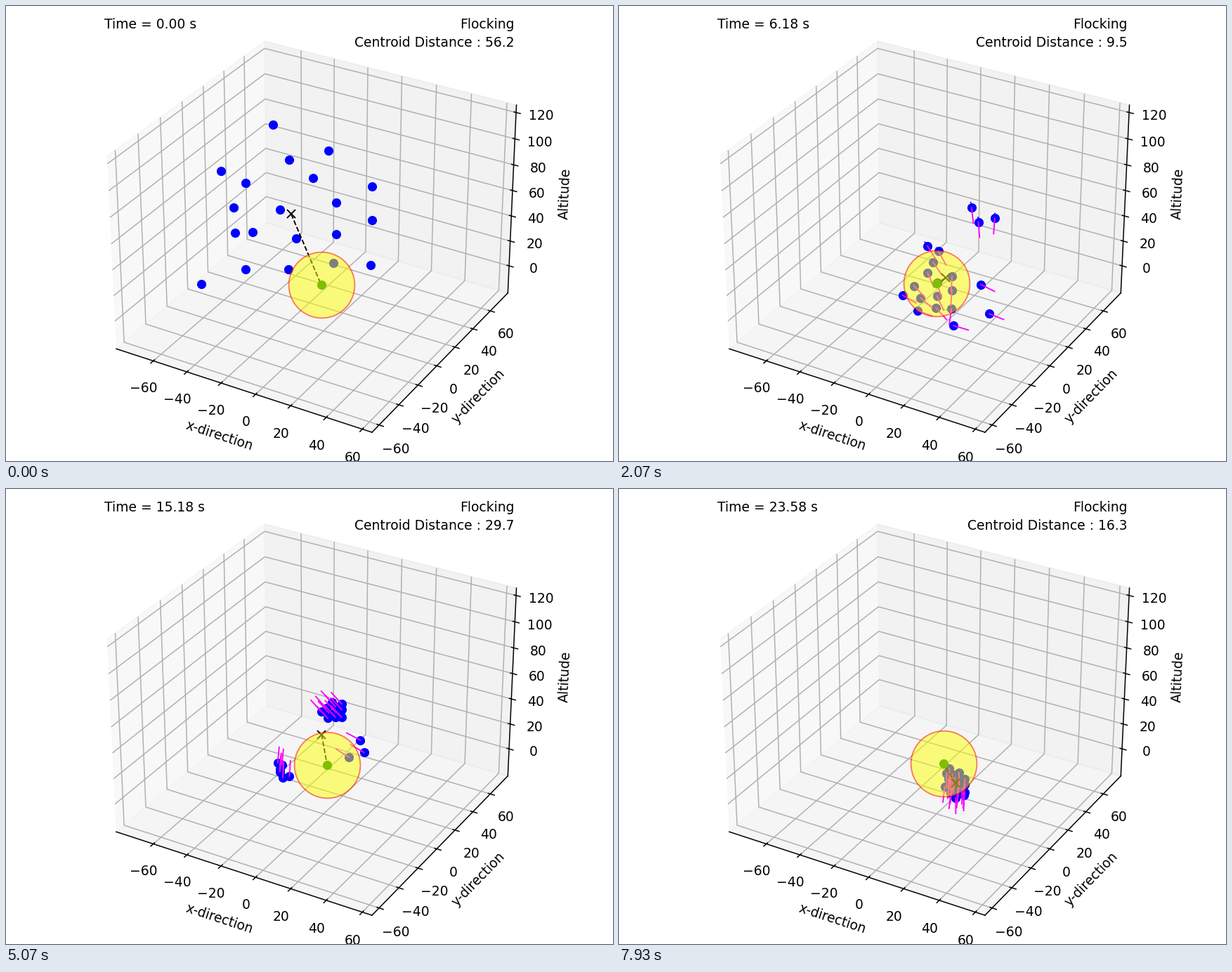
Recreate the animation shown at these times as a matplotlib script. Size 864 by 648 pixels, loop 8 s.

```python
import numpy as np
import matplotlib.pyplot as plt
from matplotlib.animation import FuncAnimation

FRAMES, LOOP_MS = 120, 8000
W, H = 864, 648
GOLDEN = np.pi * (3 - 5 ** 0.5)
ARROW = 22

KEYS = np.array([0, 13, 31, 46, 63, 90, 119, 131])
GAPS = np.array([56.2, 47.6, 9.5, 22.5, 25.3, 32.1, 16, 15])


def spline(points, k):
    """Smooth curve through one point per key, evaluated at frame k."""
    slope = np.gradient(points, KEYS, axis=0)
    i = min(np.searchsorted(KEYS, k, side="right") - 1, len(KEYS) - 2)
    h = KEYS[i + 1] - KEYS[i]
    s = (k - KEYS[i]) / h
    return ((1 + 2 * s) * (1 - s) ** 2 * points[i]
            + s * (1 - s) ** 2 * h * slope[i]
            + s * s * (3 - 2 * s) * points[i + 1]
            - s * s * (1 - s) * h * slope[i + 1])


class Squad:
    """Birds on a sunflower disc that contracts while its centre flies a path."""

    def __init__(self, size, radius, phase, settle, path):
        j = np.arange(size)
        r = radius * np.sqrt((j + 0.5) / size)
        a = np.radians(phase) + GOLDEN * j
        disc = np.column_stack([r * np.cos(a), 0.85 * r * np.sin(a)])
        self.disc = disc - disc.mean(axis=0)
        self.settle = settle
        self.path = np.array(path, float)

    def at(self, k):
        spread = 0.17 + 0.83 * np.exp(-(k / self.settle) ** 2)
        return spline(self.path, k) + spread * self.disc


squads = [
    Squad(3, 60, 95, 28, [(414, 198), (473, 187), (516, 299), (496, 432),
                          (411, 454), (409, 353), (476, 405), (458, 433)]),
    Squad(3, 42, -40, 30, [(324, 258), (352, 260), (447, 352), (473, 438),
                           (401, 441), (404, 345), (469, 411), (451, 439)]),
    Squad(3, 65, 6, 60, [(315, 365), (387, 374), (506, 430), (551, 441),
                         (559, 413), (436, 342), (486, 437), (468, 466)]),
    Squad(11, 105, 20, 28, [(451, 315), (442, 342), (445, 409), (475, 415),
                            (485, 353), (445, 304), (480, 426), (462, 454)]),
]


def flock(k):
    return np.vstack([s.at(k) for s in squads])


def headings(k):
    v = flock(k + 0.5) - flock(k - 0.5)
    return ARROW * v / (np.linalg.norm(v, axis=1, keepdims=True) + 1e-9)


def strokes(a, b):
    """Separate segments a -> b as one broken polyline."""
    return np.stack([a, b, np.full_like(a, np.nan)], axis=1).reshape(-1, 2).T


fig = plt.figure(figsize=(6.4, 4.8), dpi=135)

ax = fig.add_axes([0, 0, 1, 1], projection="3d")
ax.set_xlim(-82.4, 65.3)
ax.set_ylim(-67.1, 80.6)
ax.set_zlim(-22.1, 125.6)
ax.set_xticks(range(-60, 61, 20))
ax.set_yticks(range(-60, 61, 20))
ax.set_zticks(range(0, 121, 20))
ax.set_xlabel("x-direction")
ax.set_ylabel("y-direction")
ax.set_zlabel("Altitude")

clock = ax.text2D(0.05, 0.95, "", transform=ax.transAxes)
ax.text2D(0.95, 0.95, "Flocking", ha="right", transform=ax.transAxes)
gap_text = ax.text2D(0.95, 0.91, "", ha="right", transform=ax.transAxes)

# Flat layer in stage pixels for everything that flies.
sky = fig.add_axes([0, 0, 1, 1])
sky.set_xlim(0, W)
sky.set_ylim(H, 0)
sky.axis("off")

tails, = sky.plot([], [], "b:", lw=1)
birds, = sky.plot([], [], "bo")
arrows, = sky.plot([], [], color="magenta", lw=1)
link, = sky.plot([], [], "k--", lw=1)
centre, = sky.plot([], [], "kx")
goal, = sky.plot([], [], "o", color="green")
zone, = sky.plot([], [], "o", ms=50, mfc="yellow", mec="red", alpha=0.5)


def update(k):
    p = flock(k)
    birds.set_data(*p.T)
    if k:
        tails.set_data(*strokes(flock(k - 1), p))
        arrows.set_data(*strokes(p, p + headings(k)))
    else:
        tails.set_data([], [])
        arrows.set_data([], [])

    mx, my = p.mean(axis=0)
    gx, gy = 448.5 + 0.113 * k, 396.8 - 0.053 * k
    link.set_data([mx, gx], [my, gy])
    centre.set_data([mx], [my])
    goal.set_data([gx], [gy])
    zone.set_data([gx], [gy])

    clock.set_text(f"Time = {max(0, 0.2 * k - 0.02):.2f} s")
    gap_text.set_text(f"Centroid Distance : {spline(GAPS, k):.1f}")
    return tails, birds, arrows, link, centre, goal, zone, clock, gap_text


anim = FuncAnimation(fig, update, frames=FRAMES, interval=LOOP_MS / FRAMES,
                     repeat=True, repeat_delay=0, blit=False)
plt.show()
```
